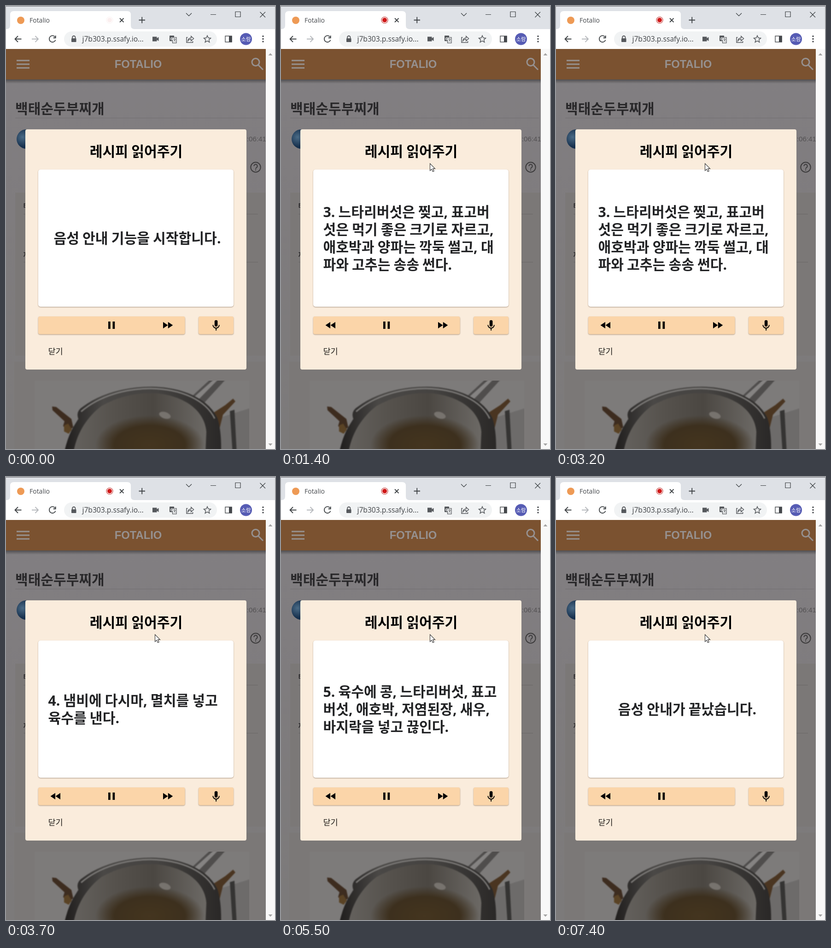
Animation of 584x959 px, one loop 7500 ms. Source, as an HTML page:

```html
<!DOCTYPE html>
<html lang="ko">
<head>
<meta charset="utf-8">
<title>Fotalio</title>
<style>
  html, body { margin: 0; width: 100%; height: 100%; overflow: hidden; background: #fff; }
  svg.stage { display: block; width: 584px; height: 959px; }
  text { font-family: "Noto Sans CJK KR", "Noto Sans KR", "Noto Sans CJK", "Noto Sans CJK JP", sans-serif; }
  .ui { font-family: "Open Sans", "Noto Sans", sans-serif; }
  .arial { font-family: "Liberation Sans", Arial, sans-serif; }
  .big, .big text {
    font-family: "Open Sans", "Noto Sans CJK KR", "Noto Sans KR", "Noto Sans CJK", "Noto Sans CJK JP", sans-serif;
    font-size: 30.2px; font-weight: 700; word-spacing: -.8px;
  }
  .line { fill: none; stroke-width: 1.8; }
  .raised { filter: drop-shadow(0 1.5px 1px rgba(70, 45, 20, .45)); }
  .soft { filter: blur(1.3px); }

  .slides, .late, .next, .rec { animation: 7.5s step-end infinite; }
  .slides { animation-name: slides; }
  .late { animation-name: late; }
  .next { animation-name: next; }
  .rec { animation-name: rec; animation-timing-function: linear; }

  @keyframes slides {
    0% { transform: translateY(0); }
    2.4% { transform: translateY(-297px); }
    6.4% { transform: translateY(-594px); }
    18.4% { transform: translateY(-891px); }
    45.2% { transform: translateY(-1188px); }
    55.8% { transform: translateY(-1485px); }
    75.8% { transform: translateY(-1782px); }
    94.4%, 100% { transform: translateY(-2079px); }
  }
  @keyframes late {
    0% { visibility: hidden; }
    2.4%, 100% { visibility: visible; }
  }
  @keyframes next {
    0% { visibility: visible; }
    94.4%, 100% { visibility: hidden; }
  }
  @keyframes rec {
    0% { opacity: .06; }
    4%, 100% { opacity: 1; }
  }
</style>
</head>
<body>
<svg class="stage" viewBox="0 0 584 959">
  <defs>
    <linearGradient id="page" x1="0" y1="0" x2="0" y2="1">
      <stop offset="0" stop-color="#827f82"/>
      <stop offset=".4" stop-color="#7f7c7e"/>
      <stop offset="1" stop-color="#7c7a7a"/>
    </linearGradient>
    <linearGradient id="shade" x1="0" y1="0" x2="0" y2="1">
      <stop offset="0" stop-color="#000" stop-opacity=".38"/>
      <stop offset="1" stop-color="#000" stop-opacity="0"/>
    </linearGradient>
    <linearGradient id="steel" x1="0" y1="0" x2="1" y2="0">
      <stop offset="0" stop-color="#1f1d1c"/>
      <stop offset=".25" stop-color="#4a4846"/>
      <stop offset=".6" stop-color="#454341"/>
      <stop offset="1" stop-color="#2a2827"/>
    </linearGradient>
    <linearGradient id="inside" x1="0" y1="0" x2="1" y2="0">
      <stop offset="0" stop-color="#64615d"/>
      <stop offset=".3" stop-color="#56524d"/>
      <stop offset=".6" stop-color="#4b4742"/>
      <stop offset="1" stop-color="#6c6965"/>
    </linearGradient>
    <radialGradient id="broth">
      <stop offset="0" stop-color="#44351f"/>
      <stop offset=".65" stop-color="#3d301e"/>
      <stop offset="1" stop-color="#3d301e" stop-opacity="0"/>
    </radialGradient>
    <radialGradient id="face" cx=".3" cy=".4">
      <stop offset="0" stop-color="#4a6a85"/>
      <stop offset="1" stop-color="#16304d"/>
    </radialGradient>
    <clipPath id="photo"><rect x="62" y="811" width="466" height="148"/></clipPath>
  </defs>

  <!-- browser chrome -->
  <rect width="584" height="52" fill="#dee1e6"/>
  <rect width="584" height="1" fill="#6d6f73"/>
  <path d="M1 50Q9 50 9 42V19Q9 11 17 11H263Q271 11 271 19V42Q271 50 279 50Z" fill="#fff"/>
  <rect y="50" width="584" height="43" fill="#fff"/>
  <circle cx="32" cy="31" r="8" fill="#ee9a55"/>
  <text class="ui" x="51" y="35.5" font-size="14" fill="#44474b">Fotalio</text>
  <g class="rec">
    <circle cx="225" cy="30.5" r="7" fill="#fff" stroke="#c5413d" stroke-width="1.2"/>
    <circle cx="225" cy="30.5" r="5" fill="#cf1717"/>
  </g>
  <g class="line" stroke="#3c4043">
    <path d="M247 26.5l8.5 8.5m0-8.5l-8.5 8.5M288.5 30.5h13.500m-6.750-6.750v13.500"/>
    <path d="M391 15.500l6 6 6-6M444 18.500h12M498 12.500h11v11h-11zM551.500 13l11.500 11.500m0-11.500l-11.500 11.500" stroke-width="1.15" style="stroke-width:1.2"/>
    <path d="M33.500 71.500H19.500m6.500-6.500l-6.500 6.500 6.500 6.500"/>
    <path d="M56 71.500h14m-6.500-6.500l6.500 6.500-6.500 6.500" stroke="#b4b7bb"/>
    <path d="M106.500 67a7 7 0 1 0 1 6.500M107.700 64v5h-5"/>
  </g>
  <rect x="126" y="55" width="332" height="33" rx="16.500" fill="#f1f3f4"/>
  <g fill="#55585c">
    <rect x="142" y="70" width="10.500" height="8" rx="1"/>
    <path class="line" d="M144 70v-2a3.250 3.250 0 0 1 6.500 0v2" stroke="#55585c"/>
    <path d="M318 66.500h9.500v3.500l4-3v9l-4-3v3.500H318z"/>
    <rect x="355" y="64" width="10" height="12" rx="1"/>
    <rect x="361.500" y="68" width="8.500" height="12" fill="#f1f3f4" stroke="#55585c" stroke-width="1.200"/>
    <text class="ui" x="356.500" y="74" font-size="9" font-weight="700" style="fill:#f1f3f4">G</text>
    <path class="line" d="M363 71.500h5.500m-2.700-1.500v1.500m2 0q-.8 3.500-4 5m.8-3.500l3.600 4" stroke="#55585c" style="stroke-width:1"/>
  </g>
  <text class="ui" x="165.500" y="77" font-size="15.600" fill="#3f4246">j7b303.p.ssafy.io...</text>
  <g class="line" stroke="#55585c" style="stroke-width:1.500">
    <path d="M394.500 68h-2.500v11h13.500v-3M394.800 75.500q.5-6 7-6.500v-3.500l5.700 5-5.700 5v-3.500q-4.500 0-7 3.500z"/>
    <path d="M437 64l2.200 5 5.300.5-4 3.600 1.200 5.300-4.700-2.800-4.700 2.800 1.200-5.300-4-3.600 5.300-.5z"/>
    <rect x="476" y="65" width="14" height="13"/>
  </g>
  <rect x="484" y="65" width="6.500" height="13" fill="#44474b"/>
  <circle cx="521" cy="71.500" r="13" fill="#565cb4"/>
  <text x="521" y="75.500" text-anchor="middle" font-size="11.500" fill="#fff">소람</text>
  <g fill="#44474b"><circle cx="558" cy="65.500" r="1.700"/><circle cx="558" cy="71.300" r="1.700"/><circle cx="558" cy="77" r="1.700"/></g>

  <!-- dimmed page -->
  <rect y="93" width="564" height="866" fill="url(#page)"/>
  <rect x="20" y="404" width="544" height="353" fill="#7b7877"/>
  <rect x="18" y="770" width="546" height="189" fill="#7b7877"/>
  <rect y="159" width="564" height="9" fill="url(#shade)"/>
  <rect y="93" width="564" height="66" fill="#7b5230"/>
  <path d="M23 118h28M23 126h28M23 134h28" stroke="#979290" stroke-width="2.800"/>
  <text class="arial" x="287" y="133.500" text-anchor="middle" font-size="23.800" font-weight="700" fill="#969190">FOTALIO</text>
  <g class="line" stroke="#969190" style="stroke-width:3"><circle cx="542" cy="121.500" r="8"/><path d="M547.500 127.500l10.500 10.500"/></g>
  <text x="20" y="232.500" font-size="30.100" font-weight="700" fill="#29282a">백태순두부찌개</text>
  <path d="M20 242.500H560" stroke="#716e70"/>
  <circle cx="44" cy="288" r="21" fill="url(#face)"/>
  <text class="arial" x="565" y="293" text-anchor="end" font-size="15.200" fill="#535153">:06:41</text>
  <g class="line" stroke="#3c3b3c" style="stroke-width:2"><circle cx="542" cy="349" r="10.700"/><path d="M538.300 346.500a3.700 3.700 0 1 1 5.800 3q-2.100 1.500-2.100 3.200"/></g>
  <rect x="541" y="354" width="2" height="2" fill="#3c3b3c"/>
  <g font-size="15" font-weight="700" fill="#302f30"><text x="37.500" y="438">태그</text><text x="37.500" y="544">재료</text></g>
  <path d="M38 450.500H547M38 554.500H547" stroke="#6a6766"/>

  <!-- photo -->
  <g clip-path="url(#photo)"><g class="soft">
    <rect x="52" y="801" width="486" height="168" fill="#7d7b7a"/>
    <path d="M462 892L538 868V969H462z" fill="#6d6b6a"/>
    <path d="M486 877l10-3 5 95h-9z" fill="#353433"/>
    <path d="M100 867l9 1 33 26 4 18-12 9-10-12 3-10-26-24z" fill="#3d2c1f"/>
    <path d="M126 908l9-4 8 13-7 9-10-5z" fill="#5a4325"/>
    <path d="M448 882l28-18 17-14 5 6-27 29-7 28-10-2z" fill="#4a3521"/>
    <path d="M396 852L447 805H480L424 866z" fill="#4f4d4c"/>
    <path d="M402 852L455 805H464L412 858z" fill="#858382"/>
    <path d="M126 969C135 926 147 910 157 894Q151 877 166 868C205 838 262 824 314 824C382 824 440 850 459 892Q468 918 467 969Z" fill="url(#steel)"/>
    <path d="M146 969C153 924 176 890 207 866C246 844 285 837 322 838C387 843 431 875 435 922L433 969Z" fill="url(#inside)"/>
    <path d="M163 878C204 843 262 828 314 828C382 829 434 854 453 893" class="line" stroke="#7d7b79" style="stroke-width:3"/>
    <ellipse cx="312" cy="950" rx="118" ry="64" fill="url(#broth)"/>
    <ellipse cx="345" cy="886" rx="13" ry="7" fill="#77736e" transform="rotate(18 345 886)"/>
  </g></g>

  <!-- scrollbar -->
  <rect x="564" y="93" width="20" height="866" fill="#f8f8f8"/>
  <path d="M569.500 107l4.500-5 4.500 5zM569.500 947l4.500 5 4.500-5z" fill="#a3a3a3"/>

  <!-- dialog -->
  <rect x="42" y="267" width="480" height="520" rx="4" fill="#faecdc"/>
  <text class="big" x="282.500" y="325.500" text-anchor="middle">레시피 읽어주기</text>
  <rect class="raised" x="70" y="354" width="424" height="297" rx="5" fill="#fff"/>
  <svg x="70" y="354" width="424" height="297"><g class="slides big" fill="#222325"></g></svg>
  <g class="raised" fill="#fbd5a9">
    <rect x="70" y="672" width="318.500" height="38.500" rx="4"/>
    <rect x="418" y="672" width="76" height="38.500" rx="4"/>
  </g>
  <path class="late" d="M107 684v14l-10.500-7zM118 684v14l-10.500-7z"/>
  <path d="M222 683h4.700v16H222zM231.500 683h4.700v16h-4.700z"/>
  <path class="next" d="M341 684v14l10.500-7zM351.800 684v14l10.500-7z"/>
  <rect x="452.800" y="680" width="6.600" height="14" rx="3.300"/>
  <path class="line" d="M449.300 690.500a6.800 6.800 0 0 0 13.600 0M456.100 697.500v5" stroke="#000" style="stroke-width:2"/>
  <text x="91.500" y="754" font-size="17.500" fill="#1f1c19">닫기</text>

  <path class="late" d="M323.500 341v15.500l3.600-3.300 2.500 5.300 2.600-1.200-2.500-5.200h4.800z" fill="#fff" stroke="#333" stroke-width="1.100"/>
</svg>

<script>
  const slides = [
    ["음성 안내 기능을 시작합니다."],
    ["1. 바지락은 소금물에 담가 해", "감한다."],
    ["2. 콩을 충분히 불려 믹서기에", "물을 넣고 갈아 준비한다."],
    ["3. 느타리버섯은 찢고, 표고버", "섯은 먹기 좋은 크기로 자르고,", "애호박과 양파는 깍둑 썰고, 대", "파와 고추는 송송 썬다."],
    ["4. 냄비에 다시마, 멸치를 넣고", "육수를 낸다."],
    ["5. 육수에 콩, 느타리버섯, 표고", "버섯, 애호박, 저염된장, 새우,", "바지락을 넣고 끊인다."],
    ["6. 순두부를 넣고 끊인 후 양파,", "대파, 붉은 고추, 풋고추를 넣", "고 한소끔 끓여 마무리한다."],
    ["음성 안내가 끝났습니다."]
  ];
  const strip = document.querySelector(".slides");
  const SLIDE = 297, LEADING = 38;

  slides.forEach((lines, n) => lines.forEach((line, i) => {
    const text = document.createElementNS("http://www.w3.org/2000/svg", "text");
    const single = lines.length === 1;
    text.setAttribute("x", single ? 215 : 21.5);
    text.setAttribute("y", n * SLIDE + 160 + (i - (lines.length - 1) / 2) * LEADING);
    if (single) text.setAttribute("text-anchor", "middle");
    text.textContent = line;
    strip.append(text);
  }));
</script>
</body>
</html>
```
